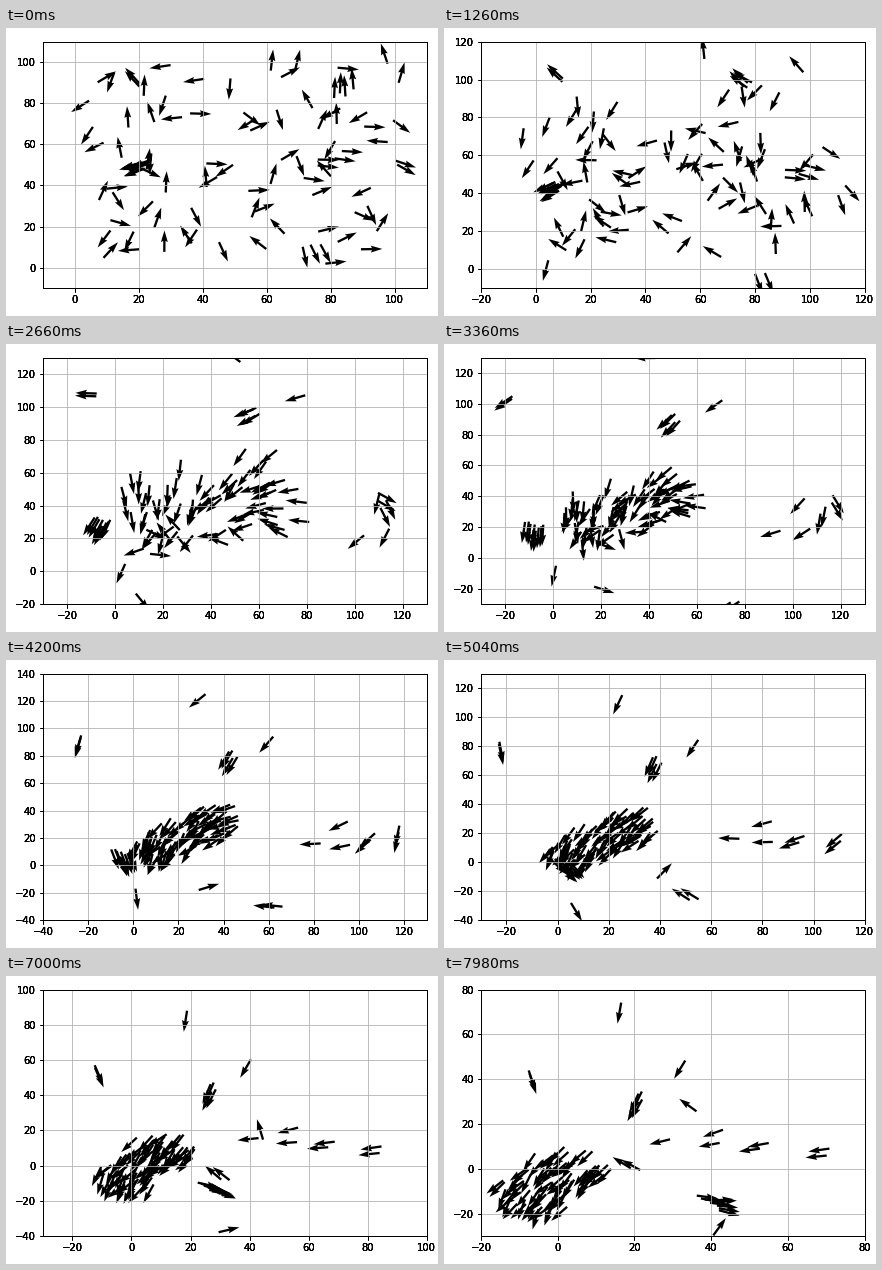
Recreate the animation shown at these times as a matplotlib script. Size 432 by 288 pixels, loop 8000 ms.

```python
import numpy as np
import matplotlib.pyplot as plt
from matplotlib.animation import FuncAnimation
from matplotlib.ticker import MultipleLocator

W, H, DPI = 432, 288, 72
LOOP, INTERVAL, STEP = 8000, 40, 140
LAST, MID = LOOP // STEP, 30
TURN = 0.13
rng = np.random.default_rng(5)

# Groups outside the flock halfway through: x, y, heading, birds
GROUPS = [
    (32, 125, 219, 1), (62, 94, 229, 1), (-23, 93, 254, 2), (45, 81, 239, 4),
    (116, 27, 258, 2), (108, 21, 222, 2), (95, 32, 206, 1), (96, 15, 192, 1),
    (83, 16, 183, 1), (1, -17, 277, 1), (65, -28, 174, 2), (29, -18, 17, 1),
    (-6, 9, 291, 9),
]


def turned(deg):
    return np.exp(1j * np.radians(deg))


def uniform(size, n):
    return rng.uniform(-size, size, n) + 1j * rng.uniform(-size, size, n)


def centre(t):
    """The flock drifts evenly down to the left."""
    return 36 + 37j - (0.97 + 1.08j) * (t - 19)


def fly_groups():
    """Steer towards the flock, from the middle state both ways in time."""
    x, y, deg, count = np.array(GROUPS).T
    near = np.repeat(np.where(count > 1, 1, 0) * (2.5 + 0.2 * count), count)
    z0 = np.repeat(x + 1j * y, count)
    z0 = z0 + near * uniform(1, len(z0))
    h0 = np.radians(np.repeat(deg, count))
    place = np.empty((LAST + 1, len(z0)), complex)
    aim = place.copy()
    for way in (1, -1):
        z, h = z0, h0
        for t in range(MID, LAST + 1 if way > 0 else -1, way):
            place[t], aim[t] = z, np.exp(1j * h)
            gap = centre(t) - z
            pull = TURN * np.minimum(1, abs(gap) / 60)
            speed = 1.5 + 0.5 * min(1, t / 15)
            if way < 0:
                z = z - speed * np.exp(1j * h)
            h = h + way * pull * np.sin(np.angle(gap) - h)
            if way > 0:
                z = z + speed * np.exp(1j * h)
    return place, aim


# Flock birds start scattered, one in each cell of a loose grid
COLS, ROWS = 9, 8
N = COLS * ROWS
cell = np.arange(N)
start = ((cell % COLS + rng.random(N)) * 100 / COLS
         + 1j * (cell // COLS + rng.random(N)) * 100 / ROWS)
slot = (start - 50 - 50j) / 50 + uniform(0.12, N)
slot = slot / np.maximum(1, abs(slot))
heading = turned(rng.uniform(0, 360, N))
bend = rng.uniform(0.05, 0.18, N) * rng.choice([-1, 1], N)
phase = rng.uniform(0, 2 * np.pi, N)


def flock(t):
    """Curved free flight that eases into a slot of the tilted strip."""
    free = start + 1.6 * heading * (np.exp(1j * bend * t) - 1) / (1j * bend)
    tilt = turned(18 + 0.55 * t)
    sway = 2.5 * np.sin(0.15 * t + phase)
    length = 40 - 0.42 * t
    strip = centre(t) + tilt * (length * slot.real + 1j * (10 * slot.imag + sway))
    s = np.clip(t / 32, 0, 1)
    ease = s * s * (3 - 2 * s)
    return free + ease * (strip - free)


GROUP_PLACE, GROUP_AIM = fly_groups()


def state(t):
    move = flock(t + 0.5) - flock(t - 0.5)
    place = np.concatenate([GROUP_PLACE[t], flock(t)])
    aim = np.concatenate([GROUP_AIM[t], move / abs(move)])
    return np.column_stack([place.real, place.imag]), aim


def view(t):
    """Edges that grow and shrink, rounded out to whole tens."""
    left = np.interp(t, [0, 30, 57], [-3, -31, -17.5])
    right = np.interp(t, [0, 19, 33, 57], [104, 126, 122, 78])
    bottom = np.interp(t, [9, 30, 50, 57], [-6, -34, -36, -28])
    top = np.interp(t, [0, 30, 57], [101, 132, 79])
    low, high = np.floor, np.ceil
    return ([low(left / 10) * 10, high(right / 10) * 10],
            [low(bottom / 10) * 10, high(top / 10) * 10])


plt.rcParams["font.family"] = "DejaVu Sans"
fig = plt.figure(figsize=(W / DPI, H / DPI), dpi=DPI, facecolor="white")
box = [36.9 / W, 27.87 / H, 383.9 / W, 246.49 / H]
ax = fig.add_axes(box)
ax.grid(True)
ax.xaxis.set_major_locator(MultipleLocator(20))
ax.yaxis.set_major_locator(MultipleLocator(20))

# Repeated passes harden the edges of labels, ticks and frame
for _ in range(3):
    fig.add_axes(box, sharex=ax, sharey=ax, facecolor="none", label=f"pass {_}")

pos, aim = state(0)
birds = ax.quiver(*pos.T, aim.real, aim.imag, color="black", scale=18, width=0.006)


def update(n):
    t = (n * INTERVAL + INTERVAL // 2) // STEP
    pos, aim = state(t)
    birds.set_offsets(pos)
    birds.set_UVC(aim.real, aim.imag)
    xlim, ylim = view(t)
    ax.set_xlim(xlim)
    ax.set_ylim(ylim)
    return birds,


anim = FuncAnimation(fig, update, frames=LOOP // INTERVAL, interval=INTERVAL,
                     repeat=True, repeat_delay=0, blit=False)
plt.show()
```
